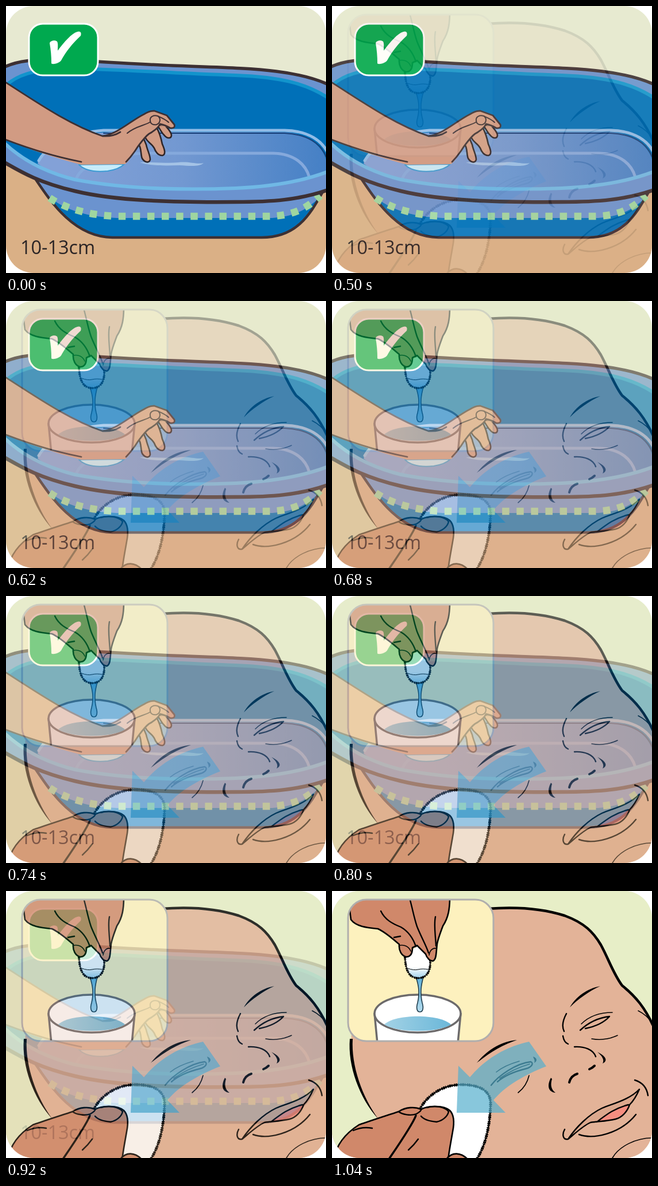
An HTML page that plays this animation: 557 px wide and 466 px high, repeating every 8000 ms.

```html
<!DOCTYPE html>
<html lang="en">
<head>
<meta charset="utf-8">
<title>Bath and eye care</title>
<style>
  html, body { margin: 0; width: 100%; height: 100%; overflow: hidden; background: #fff; }
  svg { display: block; width: 557px; height: 466px; }
  path, ellipse { stroke-linecap: round; stroke-linejoin: round; }
  .line { fill: none; stroke: #3d3033; }
  .ink { fill: none; stroke: #000; stroke-width: 2.4; }
  .thin { stroke-width: 1.6; }
  .fill { fill: #000; }
  .arm { fill: #d19b83; stroke: #2e2528; stroke-width: 2.6; }
  .hand { fill: #d0886a; stroke: #000; stroke-width: 2.6; }
  .fuzz { fill: none; stroke: #000; stroke-width: 5; stroke-dasharray: 3 1.2 1.5 2.5 2 1; stroke-linecap: butt; }
  text { font: 32.4px "Open Sans", "Noto Sans", sans-serif; fill: #2a2425; }
  #eyes { animation: fade 8s infinite; }
  @keyframes fade {
    0% { opacity: 0; }
    5.5% { opacity: 0; animation-timing-function: steps(10, end); }
    13%, 100% { opacity: 1; }
  }
</style>
</head>
<body>
<svg viewBox="0 0 557 466">
  <defs>
    <clipPath id="card"><rect width="557" height="466" rx="48"/></clipPath>
    <clipPath id="box"><rect x="28" y="15" width="253" height="247" rx="32"/></clipPath>
    <linearGradient id="water"><stop offset=".1" stop-color="#83a1d7"/><stop offset=".5" stop-color="#7298d1"/><stop offset="1" stop-color="#4580c5"/></linearGradient>
    <linearGradient id="cup"><stop stop-color="#a3d2e5"/><stop offset="1" stop-color="#6ab7d9"/></linearGradient>
    <linearGradient id="wet" x2="0" y2="1"><stop offset=".65" stop-color="#fff"/><stop offset="1" stop-color="#a3d3ec"/></linearGradient>
    <linearGradient id="drop" x2="0" y2="1"><stop stop-color="#5fb1da"/><stop offset="1" stop-color="#b5dcee"/></linearGradient>
  </defs>

  <g id="bath" clip-path="url(#card)">
    <path fill="#e7e9d1" d="M0 0H557V240H0Z"/>
    <path fill="#dab086" d="M0 240H557V466H0Z"/>

    <!-- lower tub -->
    <path fill="#0070b8" d="M52 300C75 342 120 403 185 404H445C505 404 528 366 551 325V300Z"/>
    <path fill="#6b93cf" d="M52 300L76 334C110 362 160 370 200 370H455C500 370 525 355 549 331V300Z"/>
    <path class="line" stroke-width="4.5" d="M52 303C80 345 120 403 185 404H445C505 404 528 366 551 325"/>
    <path fill="none" stroke="#9fd6a0" stroke-width="12.5" stroke-dasharray="12.5 12.6" style="stroke-linecap:butt" d="M76 335C110 358 160 367 200 367H455C500 367 525 352 547 331"/>

    <!-- rim and inside -->
    <path fill="#6b93cf" d="M-6 108C20 95 50 93 90 94C150 96 220 101 290 104C370 107 425 108 470 114C510 119 540 127 563 138V320C510 339 460 342 400 342C290 343 190 340 120 323C60 309 30 292 -6 271Z"/>
    <path fill="#0070b8" d="M-6 145C15 120 50 110 110 109C190 110 280 117 400 121C480 124 525 136 563 162V288C520 305 470 315 400 318C300 322 200 318 120 303C60 288 20 262 -6 236Z"/>
    <path fill="none" stroke="#1294cc" stroke-width="6" d="M-6 145C15 120 50 110 110 109C190 110 280 117 400 121C480 124 525 136 563 162"/>
    <path fill="url(#water)" d="M55 275C62 250 120 222 180 220H485C530 222 557 252 558 275V290C520 305 470 315 400 318C300 322 200 318 120 303C90 296 70 287 55 275Z"/>
    <path fill="none" stroke="#173f78" stroke-width="2" d="M170 222H485C525 224 548 240 557 263"/>
    <path fill="none" stroke="#90bce7" stroke-width="5" d="M57 270C70 245 115 221 170 217H485C528 218 551 236 561 258"/>
    <path fill="none" stroke="#85a9dc" stroke-width="5" d="M123 300C132 276 185 258 245 257H465C503 258 522 277 528 299"/>
    <path fill="none" stroke="#70b8e5" stroke-width="6" d="M-6 236C20 262 60 288 120 303C200 318 300 322 400 318C470 315 520 305 563 288"/>
    <path class="line" stroke-width="5.5" d="M-6 108C20 95 50 93 90 94C150 96 220 101 290 104C370 107 425 108 470 114C510 119 540 127 563 138"/>
    <path class="line" stroke-width="6.5" d="M-6 271C30 292 60 309 120 323C190 340 290 343 400 342C460 342 510 339 563 320"/>
    <path fill="#a4c3e6" d="M233 273C260 272 278 275 300 273C320 271 332 277 344 274C337 281 320 279 302 278C275 279 250 279 233 273Z"/>

    <!-- arm -->
    <path fill="#c8ecfa" stroke="#3b9bd3" stroke-width="2" d="M127 277C138 288 157 290 177 288C190 286 200 282 206 276Z"/>
    <path class="arm" d="M242 229C248 240 252 238 258 248C261 256 266 261 272 261C279 259 276 250 272 241C270 231 268 222 262 212"/>
    <path class="arm" d="M231 242C236 247 234 259 237 266C241 273 249 275 251 268C251 260 246 252 244 242L239 230"/>
    <path class="arm" d="M263 208C268 214 270 220 275 225C280 232 288 232 288 225C286 217 280 213 277 208Z"/>
    <path fill="#d19b83" d="M-4 131C55 169 110 207 168 227C195 223 216 201 240 189Q249 183 258 183L280 191L293 207Q295 214 286 213L268 208L257 218L242 230L229 246C221 259 215 270 207 276L131 277C85 265 45 252 -4 232Z"/>
    <path class="line" stroke-width="2.8" d="M-4 131C55 169 110 207 168 227C195 223 216 201 240 189Q249 183 258 183L280 191L293 207Q295 214 286 213C279 209 274 207 268 206C265 213 258 218 249 223C242 228 235 238 229 246C221 259 215 266 209 272M131 272C85 263 45 251 -4 232M168 227C180 228 191 225 199 220"/>
    <path class="line" stroke-width="2" d="M211 222C225 210 240 209 250 203M251 200C250 193 257 190 264 192C270 196 269 204 262 207C255 208 251 205 251 200ZM264 192C273 196 278 198 283 203"/>

    <rect x="40" y="31" width="120" height="90" rx="24" fill="#00a94f" stroke="#fff" stroke-width="3"/>
    <path fill="#fff" d="M76 65C77 60 86 59 89 62C91 66 90 71 90 78C102 62 114 48 124 45C129 43 132 46 130 52C115 66 104 80 96 95C93 100 80 103 79 100C79 88 78 76 76 65Z"/>
    <text x="25" y="433">10-13cm</text>
  </g>

  <g id="eyes" clip-path="url(#card)">
    <path fill="#e7eec7" d="M0 0H557V466H0Z"/>

    <!-- head -->
    <path fill="#e3b398" d="M34 250C28 310 48 360 80 398V466H557V232C545 205 530 187 505 165C490 145 482 120 468 94C455 72 440 56 405 43C365 30 320 27 270 31L100 120Z"/>
    <path class="ink" style="stroke-width:4.5" d="M270 31C320 27 365 30 405 43C440 56 455 72 468 94C482 120 490 145 505 165C530 185 545 205 559 235"/>
    <path class="fill" d="M31 258C27 305 48 362 80 397C53 360 33 305 36 258Z"/>
    <path class="ink thin" d="M533 209C543 214 551 221 557 230"/>

    <!-- right eye -->
    <path class="fill" d="M414 203C424 185 444 170 467 166C447 175 428 189 414 203Z"/>
    <path class="ink" d="M432 243C447 229 465 221 483 219C473 230 456 237 441 240"/>
    <path class="ink thin" d="M434 232C447 219 465 212 488 212M452 258C469 261 484 258 497 252"/>
    <path class="ink" d="M408 214C401 227 400 237 404 245M402 253C403 260 406 265 411 267"/>

    <!-- nose -->
    <path class="ink" d="M422 272C440 271 455 277 459 289"/>
    <path class="fill" d="M462 281C475 287 482 296 471 301C475 294 469 287 462 281Z"/>
    <path class="ink" style="stroke-width:4" d="M448 311Q453 309 457 305M413 334C415 326 420 321 427 319"/>
    <path class="fill" d="M381 326C374 339 376 351 389 352C381 346 380 338 383 328Z"/>
    <path class="ink thin" d="M343 322C340 335 333 345 324 352"/>

    <!-- left eye -->
    <path class="fill" d="M252 300C271 276 297 262 322 260C298 268 276 281 252 300Z"/>
    <path class="ink" d="M277 339C290 322 320 301 346 298C351 300 349 307 338 310C322 314 300 322 288 333"/>
    <path class="ink thin" d="M292 327C310 314 330 306 344 302M286 316C297 307 312 301 326 297"/>
    <path class="fill" d="M350 289C357 291 358 297 352 300C354 295 351 293 350 289Z"/>

    <!-- mouth -->
    <path fill="#dca88d" d="M411 433C425 412 447 390 470 379C492 370 518 364 535 346C529 360 524 367 518 373C514 385 505 395 494 398C478 402 462 402 450 404C438 409 422 424 411 433Z"/>
    <path fill="#f58e80" d="M461 403C478 390 492 379 516 373C514 387 503 399 461 403Z"/>
    <path class="ink" d="M405 416C400 425 402 435 411 433C425 412 447 390 470 379C492 370 518 364 535 346C529 360 524 367 518 373C514 385 505 395 494 398C478 402 462 402 450 404C438 409 422 424 411 433M461 403C478 390 492 379 516 373"/>
    <path class="ink" d="M430 425C455 434 502 424 529 390M527 330C540 334 548 343 550 357"/>
    <path class="ink thin" d="M488 466C500 445 530 431 557 431"/>

    <!-- pad and hand -->
    <path fill="#fff" d="M153 381C162 362 188 338 225 338C260 338 277 350 276 373C275 402 270 440 252 468H190Z"/>
    <path class="fuzz" d="M153 381C162 362 188 338 225 338C260 338 277 350 276 373C275 402 270 440 252 468"/>
    <path class="ink" d="M153 381C162 362 188 338 225 338C260 338 277 350 276 373C275 402 270 440 252 468"/>
    <path class="hand" d="M3 468C8 440 25 422 47 408C70 400 95 392 116 385C128 377 144 376 155 381C168 374 195 374 205 383C213 391 213 405 210 420C207 438 204 452 202 470Z"/>
    <path class="ink" d="M116 385C122 390 137 393 147 389C152 386 156 383 155 381M165 378C178 374 196 376 203 385C201 394 192 401 182 403C171 402 160 399 155 393M133 452Q143 443 150 433M37 418C48 413 60 412 70 414"/>
    <path class="ink" style="stroke-width:3.5" d="M146 392C140 408 118 440 99 468"/>
    <path class="hand" d="M199 468C209 455 224 456 236 468Z"/>

    <path fill="#56afce" fill-opacity=".7" d="M343 263L373 306C335 321 302 340 281 365L302 387H217L220 305L240 325C265 295 300 272 343 263Z"/>

    <!-- inset -->
    <g clip-path="url(#box)">
      <path fill="#fdf1be" d="M28 15H281V262H28Z"/>
      <path fill="#fff" stroke="#6c6a6b" stroke-width="3.5" d="M74 214L79 266H219L224 214"/>
      <ellipse cx="149" cy="214" rx="75" ry="33" fill="#fff" stroke="#6c6a6b" stroke-width="3.5"/>
      <path fill="url(#cup)" d="M91 233C110 214 188 214 207 233C183 248 115 248 91 233Z"/>
      <path fill="url(#drop)" stroke="#1d3b4c" stroke-width="1.6" d="M146 150C151 165 153 178 149 195C146 205 148 211 153 211C158 211 160 205 157 195C153 178 155 165 159 150Z"/>
      <path fill="url(#wet)" d="M127 113L149 96L172 120C172 140 165 152 150 152C135 152 128 140 127 113Z"/>
      <path class="fuzz" style="stroke-width:4" d="M127 115C128 140 135 152 150 152C165 152 172 140 171 121"/>
      <path class="ink thin" d="M127 115C128 140 135 152 150 152C165 152 172 140 171 121"/>
      <path class="ink" style="stroke-width:1" d="M132 135Q142 139 150 137T168 137"/>
      <path class="hand" d="M28 10L33 50C42 62 60 64 80 66C93 72 104 82 117 93C116 104 121 113 129 115C137 115 140 108 140 99L148 95L163 110C165 117 171 123 176 122C182 119 181 108 183 92C185 82 189 72 193 61C203 46 205 30 205 10Z"/>
      <path class="ink" d="M85 35C92 50 105 57 120 63C132 70 141 82 146 97M136 16C141 35 143 47 148 62C155 80 164 95 168 108M180 45C177 60 180 75 181 96M108 81L119 79"/>
      <path class="ink thin" d="M117 95C126 93 134 97 137 105M169 112C170 104 175 99 181 100"/>
    </g>
    <rect x="28" y="15" width="253" height="247" rx="32" fill="none" stroke="#b0aead" stroke-width="3"/>
  </g>
</svg>
</body>
</html>
```
